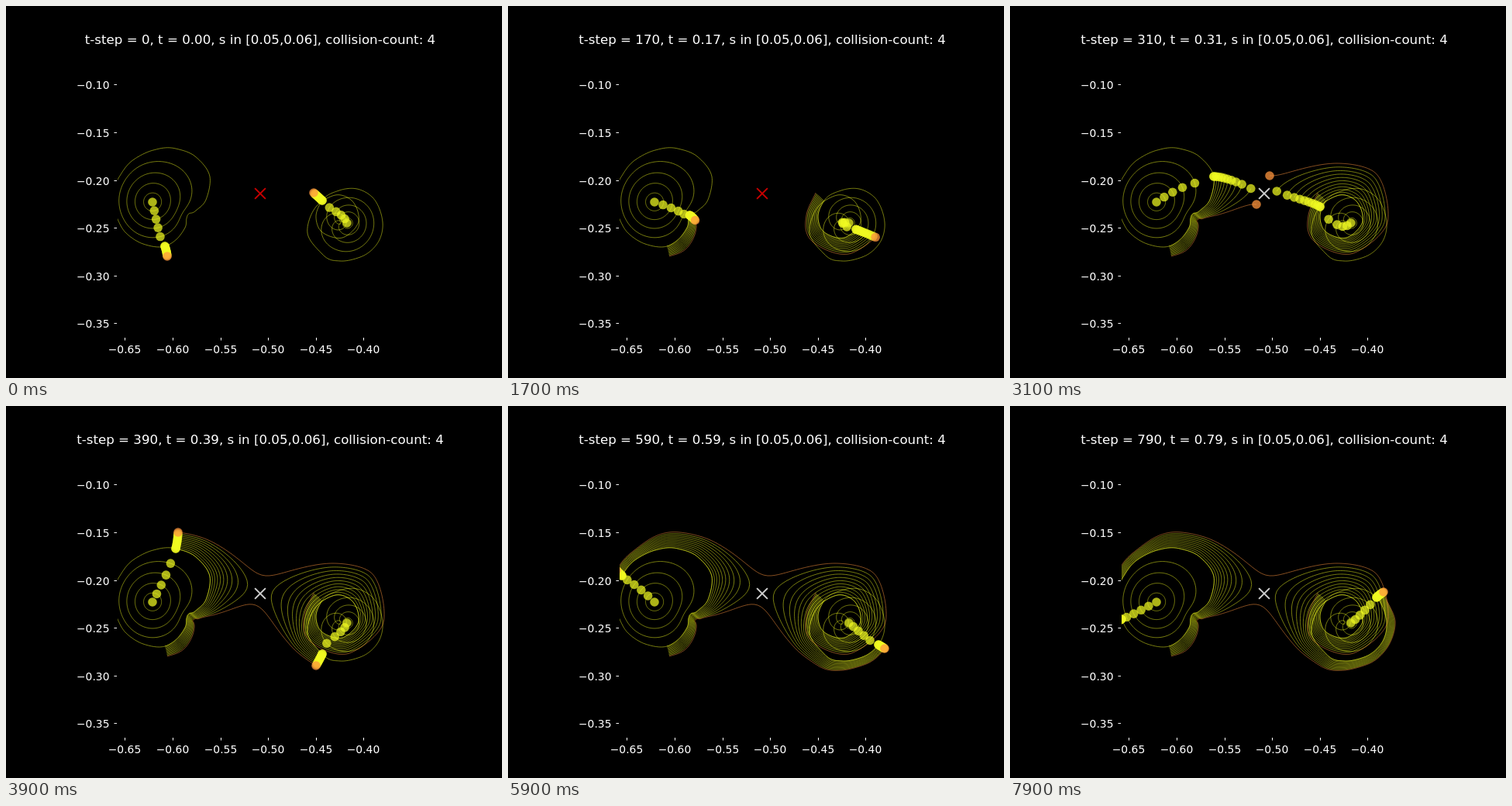
Recreate the animation shown at these times as an HTML page with a canvas. Size 640 px wide and 480 px high, loop 8 s.

```html
<!DOCTYPE html>
<html lang="en">
<head>
<meta charset="utf-8">
<title>Root loops</title>
<style>
  html, body { margin: 0; width: 100%; height: 100%; overflow: hidden; background: #000; }
  canvas, svg { position: absolute; left: 0; top: 0; width: 640px; height: 480px; }
  text { font-family: "DejaVu Sans", sans-serif; font-size: 13.89px; fill: #fff; }
  #title { font-size: 16.67px; }
  line { stroke: #fff; stroke-width: 1; }
</style>
</head>
<body>
<canvas id="stage" width="640" height="480"></canvas>
<svg id="labels" viewBox="0 0 640 480">
  <text id="title" x="328" y="49" text-anchor="middle"></text>
</svg>
<script>
const YELLOW = 'rgba(240,249,33,0.72)';
const ORANGE = 'rgba(255,150,62,0.75)';
const FRAME_MS = 100, FRAMES = 80, COLLISION_T = 0.31;
const SADDLE = [328, 242];

// Root pairs on the rings s = 0.05 and s = 0.06: t, left x, y, right x, y
const ring5 = upright([
  [0, 205, 310, 408, 251],
  [0.045, 220, 301, 400, 271],
  [0.09, 231, 286, 407, 291],
  [0.14, 233, 274, 434, 299],
  [0.19, 236, 268, 455, 278],
  [0.24, 245, 264, 445, 250],
  [0.275, 258, 250, 425, 244],
  [0.31, 263, 220, 400, 259],
  [0.35, 244, 194, 389, 293],
  [0.39, 219, 184, 408, 320],
  [0.45, 190, 186, 431, 329],
  [0.51, 165, 198, 457, 324],
  [0.59, 147, 219, 478, 308],
  [0.69, 137, 247, 486, 279],
  [0.79, 144, 275, 473, 247],
  [0.86, 155, 293, 453, 236],
  [0.93, 177, 307, 430, 238]
]);
const ring6 = upright([
  [0, 208, 323, 397, 241],
  [0.045, 230, 313, 385, 270],
  [0.09, 243, 285, 393, 304],
  [0.14, 241, 277, 443, 319],
  [0.19, 243, 275, 487, 279],
  [0.24, 250, 274, 471, 215],
  [0.275, 270, 269, 422, 203],
  [0.31, 318, 256, 335, 219],
  [0.35, 369, 311, 261, 173],
  [0.39, 400, 335, 222, 163],
  [0.45, 431, 341, 188, 169],
  [0.51, 462, 333, 158, 190],
  [0.59, 486, 313, 140, 212],
  [0.69, 497, 278, 126, 246],
  [0.79, 482, 240, 135, 280]
]);
const centres = [[189, -253], [440, -280]];

function upright(rows) {
  return rows.map(([t, a, b, c, d]) => [t, a, -b, c, -d]);
}

// Cubic Hermite spline through rows of [t, ...values]
function spline(rows) {
  const last = rows.length - 1;
  const slope = (i, k) => (rows[i + 1][k] - rows[i][k]) / (rows[i + 1][0] - rows[i][0]);
  const tangent = (i, k) => {
    if (i === 0) return slope(0, k);
    if (i === last) return slope(last - 1, k);
    const h0 = rows[i][0] - rows[i - 1][0], h1 = rows[i + 1][0] - rows[i][0];
    return (h1 * slope(i - 1, k) + h0 * slope(i, k)) / (h0 + h1);
  };
  return t => {
    let i = 0;
    while (i < last - 1 && t > rows[i + 1][0]) i++;
    const h = rows[i + 1][0] - rows[i][0], u = (t - rows[i][0]) / h, v = 1 - u;
    return [1, 2, 3, 4].map(k =>
      v * v * (1 + 2 * u) * rows[i][k] + u * u * (1 + 2 * v) * rows[i + 1][k] +
      h * u * v * (v * tangent(i, k) - u * tangent(i + 1, k)));
  };
}

// Mean of a pair and the square of half its difference; both stay smooth at a collision
function toMeanSquare([ax, ay, bx, by]) {
  const dx = (bx - ax) / 2, dy = (by - ay) / 2;
  return [(ax + bx) / 2, (ay + by) / 2, dx * dx - dy * dy, 2 * dx * dy];
}

const wrapped = [
  ...ring5.slice(-2).map(r => [r[0] - 1, ...r.slice(1)]),
  ...ring5,
  ...ring5.slice(0, 3).map(r => [r[0] + 1, ...r.slice(1)])
];
const pair5 = spline(wrapped);
const square6 = spline(ring6.map(r => [r[0], ...toMeanSquare(r.slice(1))]));

// Power series of each root in w = s * exp(2 pi i t)
const SAMPLES = 96, TERMS = 12;
const series = [0, 1].map(side => {
  const terms = [];
  for (let k = 1; k <= TERMS; k++) {
    let re = 0, im = 0;
    for (let j = 0; j < SAMPLES; j++) {
      const p = pair5(j / SAMPLES), a = 2 * Math.PI * k * j / SAMPLES;
      const x = p[2 * side], y = p[2 * side + 1], c = Math.cos(a), s = Math.sin(a);
      re += (x * c + y * s) / SAMPLES;
      im += (y * c - x * s) / SAMPLES;
    }
    terms.push([re, im]);
  }
  return terms;
});

function innerPair(s, t) {
  return series.flatMap((terms, side) => {
    let [x, y] = centres[side];
    terms.forEach(([re, im], i) => {
      const k = i + 1, r = Math.pow(s / 0.05, k), a = 2 * Math.PI * k * t;
      x += r * (re * Math.cos(a) - im * Math.sin(a));
      y += r * (re * Math.sin(a) + im * Math.cos(a));
    });
    return [x, y];
  });
}

const pairAt = (level, t) => level === 5 ? pair5(t) : innerPair(level / 100, t);

// Paths of both roots for s from 0.05 to 0.06, one point per t-step
const STEPS = (FRAMES - 1) * 10;
const bands = Array.from({ length: 11 }, () => []);
for (let n = 0; n <= STEPS; n++) {
  const t = n / 1000;
  const f4 = toMeanSquare(innerPair(0.04, t));
  const f5 = toMeanSquare(pair5(t));
  const f6 = square6(t);
  bands.forEach((band, i) => {
    const u = i / 10;
    const [mx, my, re, im] = f5.map((v, k) =>
      v + u * (f6[k] - f4[k]) / 2 + u * u * (f6[k] + f4[k] - 2 * v) / 2);
    const r = Math.sqrt(Math.hypot(re, im)), a = Math.atan2(im, re) / 2;
    let dx = r * Math.cos(a), dy = r * Math.sin(a);
    const prev = band[n - 1];
    if (prev && dx * (prev[2] - prev[0]) + dy * (prev[3] - prev[1]) < 0) {
      dx = -dx;
      dy = -dy;
    }
    band.push([mx - dx, my - dy, mx + dx, my + dy]);
  });
}

const loops = [1, 2, 3, 4, 5].map(level =>
  Array.from({ length: 301 }, (_, j) => pairAt(level, j / 300)));

const ctx = document.getElementById('stage').getContext('2d');
const title = document.getElementById('title');

function strokePair(points, count, color) {
  ctx.strokeStyle = color;
  for (const k of [0, 2]) {
    ctx.beginPath();
    for (let i = 0; i < count; i++) ctx.lineTo(points[i][k], -points[i][k + 1]);
    ctx.stroke();
  }
}

function dotPair(p, color) {
  ctx.fillStyle = color;
  for (const k of [0, 2]) {
    ctx.beginPath();
    ctx.arc(p[k], -p[k + 1], 5.8, 0, 2 * Math.PI);
    ctx.fill();
  }
}

function drawCross(color) {
  const [x, y] = SADDLE, r = 6.9;
  ctx.strokeStyle = color;
  ctx.lineWidth = 2;
  ctx.beginPath();
  ctx.moveTo(x - r, y - r);
  ctx.lineTo(x + r, y + r);
  ctx.moveTo(x - r, y + r);
  ctx.lineTo(x + r, y - r);
  ctx.stroke();
}

function draw(frame) {
  const step = frame * 10, t = step / 1000;
  const bandColor = i => i === 10 ? ORANGE : YELLOW;
  title.textContent =
    `t-step = ${step}, t = ${t.toFixed(2)}, s in [0.05,0.06], collision-count: 4`;
  ctx.clearRect(0, 0, 640, 480);
  ctx.save();
  ctx.beginPath();
  ctx.rect(144, 58, 368, 370);
  ctx.clip();
  ctx.lineWidth = 0.7;
  loops.forEach(loop => strokePair(loop, loop.length, YELLOW));
  bands.forEach((band, i) => strokePair(band, step + 1, bandColor(i)));
  for (let level = 0; level <= 5; level++) dotPair(pairAt(level, t), YELLOW);
  bands.forEach((band, i) => dotPair(band[step], bandColor(i)));
  drawCross(t < COLLISION_T ? '#c80000' : '#cfcfcf');
  ctx.restore();
}

function addSvg(name, attrs, text = '') {
  const el = document.createElementNS('http://www.w3.org/2000/svg', name);
  for (const key in attrs) el.setAttribute(key, attrs[key]);
  el.textContent = text;
  document.getElementById('labels').append(el);
}

const tickText = v => '\u2212' + v.toFixed(2);
for (let i = 0; i < 6; i++) {
  const x = Math.round(153.2 + 61.65 * i) + 0.5, y = Math.round(101.2 + 61.65 * i) + 0.5;
  addSvg('line', { x1: x, x2: x, y1: 428, y2: 431.5 });
  addSvg('text', { x: x - 0.5, y: 448, 'text-anchor': 'middle' }, tickText(0.65 - 0.05 * i));
  addSvg('line', { x1: 139.5, x2: 143, y1: y, y2: y });
  addSvg('text', { x: 133.5, y: y + 5, 'text-anchor': 'end' }, tickText(0.1 + 0.05 * i));
}

let shown = -1;
const start = performance.now();
function tick() {
  const elapsed = Math.max(0, performance.now() - start);
  const frame = Math.floor(elapsed / FRAME_MS) % FRAMES;
  if (frame !== shown) draw(shown = frame);
  requestAnimationFrame(tick);
}
tick();
</script>
</body>
</html>
```
